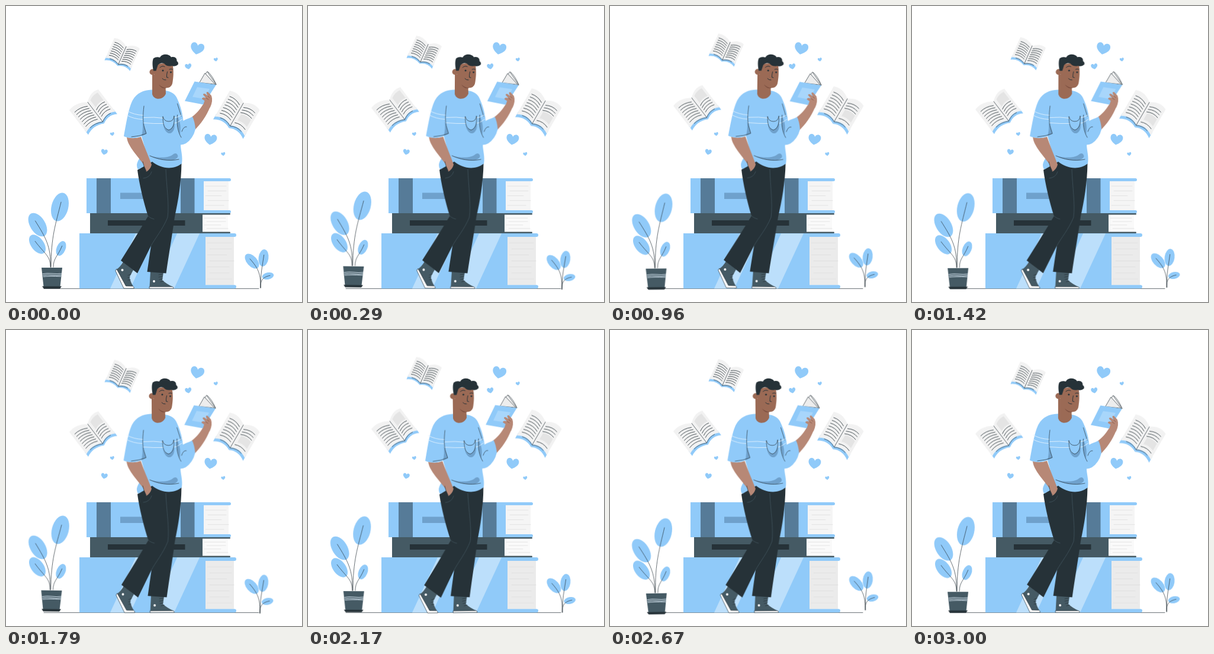
Animation of 500x500 px, one loop 3040 ms. Source, as an HTML page:

```html
<!DOCTYPE html>
<html lang="en">
<head>
<meta charset="utf-8">
<title>Reading</title>
<style>
  html, body { margin: 0; width: 100%; height: 100%; overflow: hidden; background: #fff; }
  svg { display: block; width: 100vw; height: 100vh; }
  .blue { fill: #90caf9; }
  .glow { fill: #bcdffb; }
  .shade { fill: #6fa1cc; }
  .slate { fill: #455a64; }
  .dark { fill: #263238; }
  .skin { fill: #b78876; }
  .face { fill: #9b6a55; }
  .page { fill: #f2f2f2; }
  .picture { fill: #e4e4e4; }
  .white { fill: #fff; }
  .ink, .seam, .stripe, .rule { fill: none; stroke: #263238; stroke-width: .7; stroke-linecap: round; stroke-linejoin: round; }
  .text { stroke-width: .85; }
  .bold { stroke-width: 1; }
  .seam { stroke: #455a64; }
  .stripe { stroke: #e4f2fe; stroke-width: .9; }
  .rule { stroke: #dcdcdc; }
  .sheet { fill: #f5f5f5; }
  #plants { transform-origin: 245px 396px; }
  #man { transform-origin: 270px 280px; }
</style>
</head>
<body>
<svg viewBox="0 0 500 500">
  <path class="ink" d="M64 477.4H427"/>
  <g id="stack"></g>
  <g>
    <path fill="#567b98" d="M153 291h24v59h-24zM295 291h23.5v59h-23.5z"/>
    <path class="shade" d="M193 315.5h50v10.500h-50z"/>
    <path class="dark" d="M172 362h130.500v9h-130.500z"/>
    <path class="glow" d="M176 477.200l43-93h34l-43 93zM246 477.200l43-93h38l-43 93z"/>
  </g>

  <g id="plants">
    <g id="leaves"></g>
    <path class="slate" d="M60 442H95L91.5 474H63.5Z"/>
    <path class="dark" d="M61 473.5H94L91 477.5H64Z"/>
    <path class="stripe" d="M62 452.5Q70 451 78 452T94 452M62.5 455Q70 453.5 78 454.600T93.5 454.500M63 457.200Q72 456 93 456.800"/>
  </g>

  <g id="man">
    <!-- shoes -->
    <path class="slate" d="M198 432L215 446L208.500 458Q211 468 215 473.500L201 474L186.500 445Q193 441 198 432Z"/>
    <path class="ink white" style="fill:#fff" d="M187 444.500L202.500 473L214.500 473.300Q216.300 474 216.300 477H199L185 447.500Z"/>
    <path class="ink" d="M206 455l5-2M205.500 459l4-1M206 463l4-.5"/>
    <circle class="white" cx="196.500" cy="446" r="2"/>
    <path class="slate" d="M244 448L266 450L264 463Q271 469.500 282 474.500H242.500Z"/>
    <path class="ink" style="fill:#fff" d="M242.500 474.200H281Q283.500 475 283 477.200H242.500Z"/>
    <path class="ink" d="M258 454l6-1M258 458l5.500-1M259 462l5-1M261 466l5-1.500"/>
    <circle class="white" cx="250" cy="465" r="1.900"/>

    <!-- trousers -->
    <path class="dark" d="M222 277L247 262C262 270 282 272 296.500 265C296 300 291 328 285 356C281 385 275 420 270.500 451.500L238.500 449C241 432 243 418 245 405L222 451.500L194 430C208 408 225 380 240 355C232 330 225 300 222 277Z"/>
    <path class="seam" d="M270 276C271 305 276 335 273 357C265 377 252 392 245 405M232 291Q243 290 246 280M237 351Q241 358 250 360"/>

    <!-- raised forearm -->
    <path class="skin" d="M311 190C320 183 327 176 333 166L345 170C339 185 329 200 317 211Z"/>

    <!-- shirt -->
    <path class="blue" d="M246 141.500C232 142 221 147 214 159C207 172 203 198 199 220C209 224.500 220 224 229 220L236 245C226 255 222 262 221 268Q221 275 224 276L247 263C260 273 280 279 297 266C299 254 295 243 295 234.500Q300 234 304 232Q316 224 320 208Q319 195 315 187C309 190 304 191 299.500 194C298 178 293 164 288 154C284 147 276 143 268 143Z"/>
    <path class="shade" d="M230.500 196C233 202 235 208 237 215.500Q232 219 229 219.500Q232 209 230.500 196Z"/>
    <path class="shade" d="M289 184C288 198 290 208 294 217C295 206 296 199 289 184Z"/>
    <path class="shade" d="M243 253C262 258 277 256 283 250Q289 247 290.500 254Q289 258 283 260C268 262 254 258 243 253Z"/>
    <path class="ink" d="M233 169C231 185 231 196 234 206L237 215.500Q226 220 212 221M289.500 184C288 200 290 212 296 222M297 212Q300 203 305 204M243 253C256 259 274 263 292 259M289.500 165L296 186"/>
    <path class="stripe" d="M205 177.500Q217 184 231 184.500M204 184.500Q216 191 230.500 191.500M233 188.500Q250 187 266 189.500M284 189L290 187.500M233 197.500Q250 199 266 198.500M284 198L288.500 197M291 187L297 184M290.500 196L298 191"/>
    <path class="shade" d="M265.500 199C267 211 273 216 278 215C284 212 286 205 284 195C283 203 279 208 275 209.500Q267 207 265.500 199Z"/>
    <path class="ink" d="M265 187C265 200 267 207 275 209.500C283 207 285 198 284 186M265 187Q267 195 275 195T284 186"/>

    <!-- lowered forearm -->
    <path class="skin" d="M204 222Q217 225 228 221C233 236 240 252 246 268Q244 276 237 280L232 267C217 247 206 236 204 222Z"/>
    <path class="ink" d="M231 263Q232 270 237 279"/>

    <!-- head -->
    <path class="face" d="M247 112V149C250 160 266 159 270 148L269.500 134Z"/>
    <circle class="face" cx="247.500" cy="111.500" r="5"/>
    <path class="face" d="M251 98L281 96C284 110 282.500 122 281 131Q279 138.500 270 138.500Q259 137 251 124Z"/>
    <path fill="#7d4f40" d="M258 132.500Q264 138 271 138.500Q263 141 258 132.500Z"/>
    <path class="dark" d="M249 109.500C247 100 247 93 249 88.500Q254 85 260 87C263 80.500 275 80 279 86.500C286 84.500 289 89 288.500 93Q292 95 290.500 99Q286 103 280 101Q272 103 267 97Q260 95 256.500 100L253.500 109.500Z"/>
    <path class="ink bold" d="M260 104Q264 100 268 102.500M276 107Q279 105.500 281.500 107M272.500 111Q271 117 271.500 120.500L274 121M264 122.500Q266 125.500 270 125"/>
    <circle class="dark" cx="265" cy="109" r="1.500"/>
    <circle class="dark" cx="278.500" cy="112" r="1.400"/>

    <!-- held book and hand -->
    <path class="ink sheet" style="fill:#f5f5f5" d="M340 111L355 132.500L350 134L333 121Z"/>
    <path class="ink sheet" style="fill:#ededed" d="M327 129L336 113.500L353 132Z"/>
    <path class="ink" d="M341 111Q349 118 355 132.500"/>
    <path class="blue" d="M318.500 127.500L355 133L333.500 166.500L302 160.500Z"/>
    <path fill="#a8d6fb" d="M323 137L344 140L335 157L315 153.500Z"/>
    <path class="skin" d="M332 170L335.500 160L331 157Q331 154 335 154.500L338 155.500L333 150Q333 147 336.500 148.500L341 152L338.500 147Q339 143.500 342 146L347 151.500Q350 160 345 171Q338 178 332 170Z"/>
    <path class="ink" style="stroke:#7d4f40" d="M338 155.500L342 158M341 152L344 155"/>
  </g>

  <g id="hearts"></g>
  <g id="float"></g>
</svg>
<script>
  const LOOP = 3040;
  const byId = id => document.getElementById(id);

  function add(parent, tag, attrs) {
    const el = document.createElementNS("http://www.w3.org/2000/svg", tag);
    for (const key in attrs) el.setAttribute(key, attrs[key]);
    byId(parent).appendChild(el);
  }
  const path = (parent, cls, d, more) => add(parent, "path", { class: cls, d, ...more });

  // Closed book lying flat: cover from x to inner, lips reaching to edge
  function closedBook(cls, paper, x, y, inner, edge, height, lip, lines) {
    const depth = height - 2 * lip, r = lip / 2, width = edge - inner - 6;
    add("stack", "rect", { fill: paper, x: inner, y: y + lip, width: width + 2, height: depth });
    for (let i = 0; i < lines; i++) {
      const ly = y + lip + depth * (i + 1) / (lines + 1);
      path("stack", "rule", `M${inner + 3 + (i % 2) * 4} ${ly}h${width - 5 - (i % 3) * 4}`);
    }
    const cap = `a${r} ${r} 0 0 1 0 ${lip}`;
    path("stack", cls, `M${x} ${y}H${edge - r}${cap}H${inner}v${depth}H${edge - r}${cap}H${x}Z`);
  }
  closedBook("blue", "#f5f5f5", 136, 291, 334, 380, 59, 5, 5);
  closedBook("slate", "#fafafa", 142, 350, 332, 379, 34, 2.4, 4);
  closedBook("blue", "#ebebeb", 124, 384, 337, 389, 93.2, 6, 7);

  // Open book: spine from top to foot, outer corners left and right.
  // u runs from the outer edge to the spine, v down the page.
  function openBook(top, foot, left, right, [from, to] = [1, 1]) {
    const down = [foot[0] - top[0], foot[1] - top[1]];
    for (const outer of [left, right]) {
      const at = (u, v) => [0, 1].map(k =>
        outer[k] * (1 - u) + top[k] * u + down[k] * (v * (1.15 - .15 * u) - .42 * u * (1 - u)));
      const arc = (u0, u1, v) => {
        const a = at(u0, v), b = at(u1, v), mid = at((u0 + u1) / 2, v);
        const bend = mid.map((m, k) => 2 * m - (a[k] + b[k]) / 2);
        return `${a}Q${bend} ${b}`;
      };
      const panel = (u0, u1, v0, v1) => `M${arc(u0, u1, v0)}L${arc(u1, u0, v1)}Z`;
      path("float", "blue", panel(0, 1, .9, 1.11));
      path("float", "page", panel(0, 1, 0, 1));
      path("float", "ink", `M${arc(.3, 1, 1.02)}`);
      const pictured = outer === right && from < to;
      if (pictured) path("float", "picture", panel(.15, .8, from, to));
      for (let v = .2; v < .9; v += .11) {
        if (!pictured || v < from || v > to) path("float", "ink text", `M${arc(.16, .86, v)}`);
      }
    }
    path("float", "ink", `M${top}L${foot}`);
  }
  openBook([203, 68.5], [190, 98], [183, 54], [226, 72]);
  openBook([138, 162.5], [163, 195], [107, 176], [156, 141], [.1, .45]);
  openBook([401, 164], [379, 202], [378, 143], [428.5, 176], [.48, .75]);

  // Leaf on a stem that rises from the root and runs into its axis
  function branch(rootX, rootY, x, y, size, tilt) {
    const a = tilt * Math.PI / 180;
    const along = k => `${x + Math.sin(a) * size * k} ${y - Math.cos(a) * size * k}`;
    add("leaves", "ellipse", { class: "blue", cx: x, cy: y, rx: size * .58, ry: size, transform: `rotate(${tilt} ${x} ${y})` });
    path("leaves", "ink", `M${rootX} ${rootY}C${rootX} ${(rootY + y) / 2} ${along(-1.2)} ${along(.35)}`);
  }
  branch(76, 441, 91, 339.5, 24.5, 14);
  branch(75.5, 441, 53.5, 369.5, 22, -32);
  branch(75, 441, 53, 402.5, 18.5, -37);
  branch(80, 441, 93, 409.5, 13, 22);
  branch(430, 476, 415.5, 431, 15, -42);
  branch(430, 476, 435, 425.5, 14.5, 8);
  branch(430, 476, 442.5, 456, 10, 78);

  function heart(x, y, size, tilt) {
    path("hearts", "blue",
      "M0 .43C-.25 .3-.5 .1-.5-.14C-.5-.46-.12-.52 0-.22C.12-.52 .5-.46 .5-.14C.5 .1 .25 .3 0 .43Z",
      { transform: `translate(${x} ${y}) rotate(${tilt}) scale(${size})` });
  }
  heart(323, 72, 23, 12);
  heart(345.5, 225.5, 21, 8);
  heart(308, 102, 11, -12);
  heart(166, 246.5, 11, 12);
  heart(354.5, 90.5, 7, -12);
  heart(179.5, 216.3, 7, -12);
  heart(367, 250, 7, -12);

  function play(id, duration, steps) {
    const frames = steps.map(([offset, transform]) => ({ offset, transform }));
    byId(id).animate(frames, { duration, iterations: Infinity, easing: "linear" });
  }
  const sway = [[0, "rotate(0deg)"], [.25, "rotate(1deg)"], [.75, "rotate(-1deg)"], [1, "rotate(0deg)"]];
  play("man", LOOP, sway);
  play("plants", LOOP / 2, sway);
  play("float", LOOP / 2, [[0, "translateY(0px)"], [.5, "translateY(-10px)"], [1, "translateY(0px)"]]);
</script>
</body>
</html>
```
